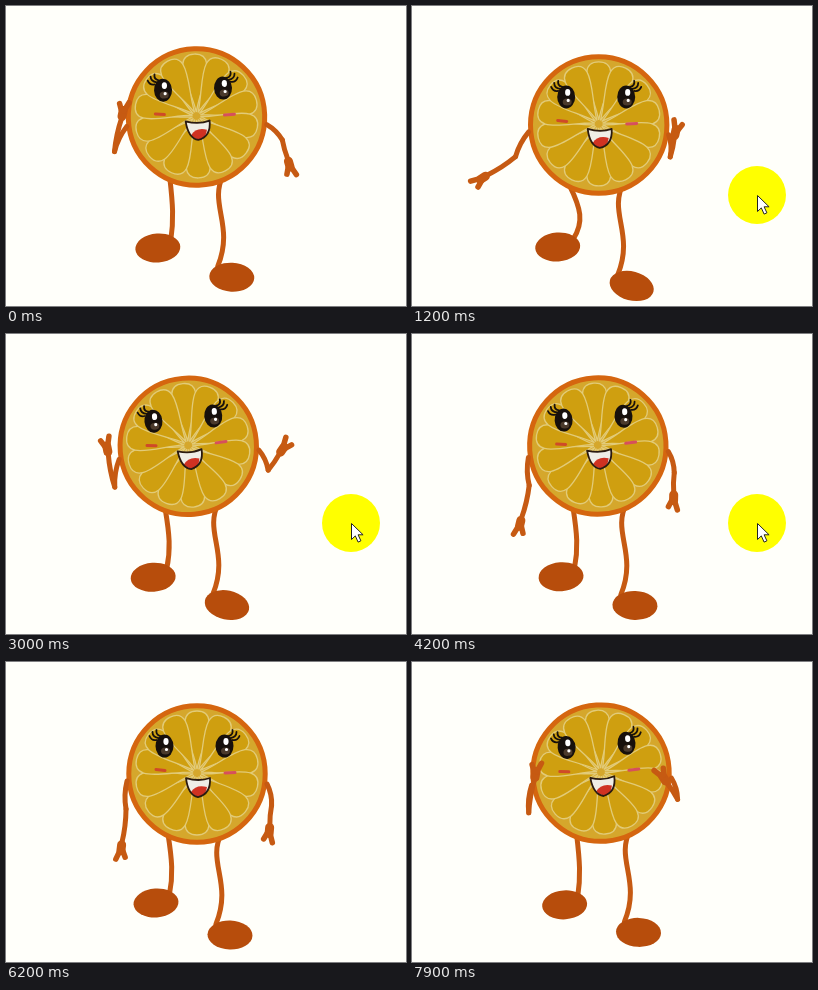
These frames come from a looping animation (400 by 300 pixels, 8000 ms). An HTML page without scripts:

```html
<!DOCTYPE html>
<html lang="en">
<head>
<meta charset="utf-8">
<title>Dancing orange slice</title>
<style>
@property --sway { syntax: "<number>"; inherits: true; initial-value: 190; }
@property --drop { syntax: "<number>"; inherits: true; initial-value: 0; }
@property --lean { syntax: "<angle>"; inherits: true; initial-value: 0deg; }

html, body { margin: 0; width: 100%; height: 100%; overflow: hidden; background: #fffffa; }
svg {
  display: block; width: 100vw; height: 100vh;
  animation: 8s ease-in-out infinite;
  animation-name: sway, drop, lean;
}
.limb { fill: none; stroke: #c65a12; stroke-width: 5; stroke-linecap: round; stroke-linejoin: round; }

#pointer { animation: pointer 8s step-end infinite; }
@keyframes pointer { 0% { opacity: 0 } 6.25% { opacity: 1 } 55% { opacity: 0 } }

/* Whole figure: drift sideways, dip, tilt */
#figure { translate: calc(var(--sway) * 1px) calc(111px + var(--drop) * 1px); rotate: var(--lean); }
@keyframes sway { 0% { --sway: 190.5 } 32% { --sway: 182 } 77% { --sway: 191 } 100% { --sway: 189 } }
@keyframes drop { 0%, 100% { --drop: 0 } 16% { --drop: 8 } 26% { --drop: 6 } 40%, 77% { --drop: 1 } 88% { --drop: 6 } }
@keyframes lean { 0% { --lean: -2deg } 15% { --lean: 0deg } 26% { --lean: -11deg } 38% { --lean: -5deg } 78% { --lean: 0deg } 100% { --lean: -4deg } }

/* Legs hang upright from the tilted hips; the left one bows to keep its foot planted */
.leg { rotate: calc(-1 * var(--lean)); }
#legL { translate: -29px 66px; }
#legR { translate: 23px 66px; }
#shin { scale: calc(1 + var(--drop) / 3) calc(1 - var(--drop) / 55); }
#footL { translate: -12px calc(64px - var(--drop) * 1px); rotate: -4deg; }
#footR { translate: 10px 95px; animation: tip 8s ease-in-out infinite; }
@keyframes tip { 0% { rotate: 3deg } 15% { rotate: 15deg } 38% { rotate: 12deg } 52%, 100% { rotate: 2deg } }

/* Arms: shoulder and elbow angles, positive is outward */
.joint { animation: 8s ease-in-out infinite; }
#armL { translate: -70px 7px; animation-name: shoulderL; }
#armR { translate: -70px 10px; animation-name: shoulderR; }
#foreL { translate: 0 28px; animation-name: elbowL; }
#foreR { translate: 0 22px; animation-name: elbowR; }
@keyframes shoulderL { 0%, 26% { rotate: 28deg } 38% { rotate: 14deg } 52%, 78% { rotate: 2deg } 100% { rotate: 10deg } }
@keyframes elbowL { 0% { rotate: 166deg } 15% { rotate: 29deg } 26% { rotate: 142deg } 38% { rotate: 160deg } 52% { rotate: 15deg } 78% { rotate: 5deg } 99%, 100% { rotate: 184deg } }
@keyframes shoulderR { 0% { rotate: 43deg } 15%, 26% { rotate: 4deg } 33% { rotate: 70deg } 38% { rotate: 19deg } 52%, 100% { rotate: 12deg } }
@keyframes elbowR { 0% { rotate: -29deg } 15%, 26% { rotate: 164deg } 33% { rotate: 40deg } 38% { rotate: 122deg } 52%, 78% { rotate: -17deg } 99%, 100% { rotate: 197deg } }
</style>
</head>
<body>
<svg viewBox="0 0 400 300">
  <defs>
    <path id="seg" d="M0-4C-3-20-13-40-12-52Q-11-62 0-62Q11-62 12-52C13-40 3-20 0-4Z"/>
    <g id="pair"><use href="#seg"/><use href="#seg" transform="rotate(180)"/></g>
    <g id="eye">
      <ellipse rx="9" ry="11.5" fill="#17100c"/>
      <ellipse cx="1" cy="5" rx="4.5" ry="3.5" fill="#4b3a2c"/>
      <ellipse cx="1.5" cy="-4.5" rx="2.6" ry="3.4" fill="#fff"/>
      <circle cx="2" cy="3.5" r="1.6" fill="#fff"/>
    </g>
    <path id="lash" d="M-4-10Q-9-11-8-16M-6-8Q-12-9-12-14M-8-6Q-13-5-15-10"
      fill="none" stroke="#17100c" stroke-width="1.8" stroke-linecap="round"/>
    <g id="hand" class="limb">
      <path d="M0 3V9" stroke-width="9"/>
      <path d="M-1 9L-4 18M2 9L5 15" stroke-width="5.5"/>
    </g>
    <ellipse id="foot" rx="22.5" ry="14.5" fill="#b74d0c"/>
    <path id="lips" d="M-11 4Q2 8 13 4Q14 20 1 23Q-9 21-11 4Z"/>
  </defs>

  <g id="pointer">
    <circle cx="345" cy="189" r="29" fill="#ff0"/>
    <path d="M345.5 189.5v16l3.8-3.6 2.8 6.2 2.8-1.3-2.8-6h5z" fill="#fff" stroke="#222"/>
  </g>

  <g id="figure">
    <g id="legL" class="leg">
      <path id="shin" class="limb" vector-effect="non-scaling-stroke" d="M0-6C3 20 4 36 1 56"/>
      <use id="footL" href="#foot"/>
    </g>
    <g id="legR" class="leg">
      <path class="limb" d="M2-8C-14 22 13 42-4 84"/>
      <use id="footR" href="#foot"/>
    </g>

    <circle r="68.2" fill="#d5a72c" stroke="#d5660f" stroke-width="5"/>
    <g transform="translate(0 -1)" fill="#cf9f10" stroke="#e2cb78" stroke-width="1.3">
      <use href="#pair"/>
      <use href="#pair" transform="rotate(25.7)"/>
      <use href="#pair" transform="rotate(51.4)"/>
      <use href="#pair" transform="rotate(77.1)"/>
      <use href="#pair" transform="rotate(102.9)"/>
      <use href="#pair" transform="rotate(128.6)"/>
      <use href="#pair" transform="rotate(154.3)"/>
    </g>

    <g transform="translate(-32.5 -28)"><use href="#eye"/><use href="#lash"/></g>
    <g transform="translate(27.5 -28)"><use href="#eye"/><use href="#lash" transform="scale(-1 1)"/></g>
    <g fill="none" stroke-width="3" stroke-linecap="round">
      <path d="M-41-4.5L-32-3.5" stroke="#cf4a28"/>
      <path d="M28-1L38-1.5" stroke="#d6505c"/>
    </g>
    <use href="#lips" fill="#efede6"/>
    <path d="M-6 18Q-1 10 10 13Q9 22 1 22.5Q-4 21-6 18Z" fill="#cf3222"/>
    <use href="#lips" fill="none" stroke="#2a1a10" stroke-width="1.8" stroke-linejoin="round"/>

    <g id="armL" class="joint">
      <path class="limb" d="M0 0Q-3 14 0 28"/>
      <g id="foreL" class="joint"><path class="limb" d="M0 0Q2 17 0 34"/><use href="#hand" y="33"/></g>
    </g>
    <g transform="scale(-1 1)">
      <g id="armR" class="joint">
        <path class="limb" d="M0 0Q-3 11 0 22"/>
        <g id="foreR" class="joint"><path class="limb" d="M0 0Q1 10 0 20"/><use href="#hand" y="19"/></g>
      </g>
    </g>
  </g>
</svg>
</body>
</html>
```
